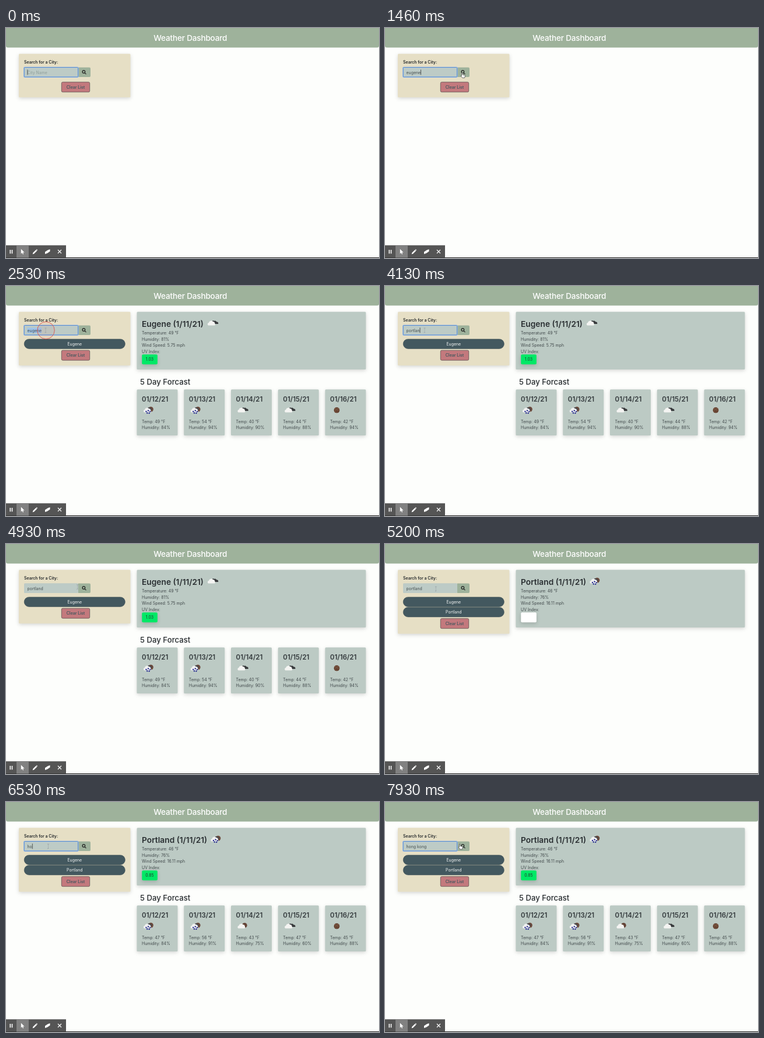
These frames come from a looping animation (640x394 px, 8000 ms). An HTML page:

```html
<!DOCTYPE html>
<html lang="en">
<head>
<meta charset="utf-8">
<title>Weather Dashboard</title>
<style>
html, body { margin: 0; width: 100%; height: 100%; overflow: hidden; background: #fdfefc; }
svg { display: block; width: 100%; height: 100%; font: 6.95px Inter, sans-serif; }
.mid { text-anchor: middle; }
.b { font-weight: 600; }
.shade { filter: drop-shadow(0 2px 3px rgba(0, 0, 0, .16)); }
</style>
</head>
<body>
<svg id="stage" viewBox="0 0 640 394" preserveAspectRatio="none">
  <defs>
    <path id="puff" d="M1.5 9A2.6 2.6 0 0 1 2.6 4.3A4 4 0 0 1 9.6 2.6A3.1 3.1 0 0 1 13 6Q14.2 9 12 9Z"/>
    <g id="cloudy">
      <path d="M7 3Q9 -.5 12 1.3Q14.5 .2 15.6 2.7Q19.5 3 18.6 6.4H11Z" fill="#383a3c"/>
      <use href="#puff" fill="#f4f4f2"/>
    </g>
    <g id="fewclouds">
      <circle cx="12.4" cy="3.8" r="4.3" fill="#634336"/>
      <use href="#puff" fill="#f4f4f2"/>
    </g>
    <g id="rain">
      <circle cx="13" cy="3.6" r="4.4" fill="#6b4a3d"/>
      <path d="M6 4Q8 -1.4 11.4 1Q14 1 14.6 4L12 7Z" fill="#45464a"/>
      <use href="#puff" fill="#f0f0f0"/>
      <g fill="#262c91">
        <circle cx="5" cy="7.4" r="1.2"/><circle cx="8.6" cy="6" r="1.2"/><circle cx="11.8" cy="7.6" r="1.2"/>
        <circle cx="6.8" cy="10" r="1.2"/><circle cx="10.2" cy="10.2" r="1.2"/>
      </g>
    </g>
    <g id="clear">
      <circle cx="10" cy="5.2" r="4.9" fill="#65412f"/>
      <path d="M6 2.5Q9 5 14 2M7 7L9 6M11 6.5L13 5" stroke="#9a7762" stroke-width=".8" fill="none"/>
    </g>
    <path id="hand" d="M2 .5Q3.1 .3 3.2 1.4V4L6.4 4.6Q7.6 4.8 7.4 6.2L6.6 9.4H2.8L.3 6.2Q.2 5 1.5 5.6V1.2Q1.5 .6 2 .5Z" fill="#fff" stroke="#333" stroke-width=".7"/>
    <path id="arrow" d="M0 0V8.4L2 6.6L3.3 9.4L4.6 8.8L3.4 6.1H6Z" fill="#222" stroke="#fff" stroke-width=".6"/>
    <path id="beam" d="M-1.3 -4Q0 -4 0 -3V3Q0 4 -1.3 4M1.3 -4Q0 -4 0 -3M0 3Q0 4 1.3 4" fill="none" stroke="#667" stroke-width=".7" stroke-dasharray="1 1.2" opacity=".75"/>
  </defs>

  <rect width="640" height="394" fill="#fdfefc"/>
  <path d="M0 0H640V30.5Q640 33.5 637 33.5H3Q0 33.5 0 30.5Z" fill="#9eb29b"/>
  <text class="mid" x="316.3" y="22.3" fill="#fff" font-size="13.6" font-weight="500" letter-spacing="-.2">Weather Dashboard</text>

  <g id="view"></g>

  <rect y="393" width="640" height="1" fill="#1b1b1b"/>
  <path d="M0 372.3H103V393.4H0Z" fill="#555"/>
  <path d="M18 372.3H39V393.4H18Z" fill="#818181"/>
  <g fill="#fff">
    <path d="M6.5 380H8.1V386.5H6.5ZM9.7 380H11.3V386.5H9.7Z"/>
    <path d="M25.8 378.5V386.7L27.7 385L29 387.8L30.2 387.2L29 384.6H31.6Z"/>
    <path d="M45.7 387.4L46.3 385L51.4 379.9L53.2 381.7L48.1 386.8ZM51.9 379.4L52.5 378.8L54.3 380.6L53.7 381.2Z"/>
    <path d="M67 387.3V383.5L71.5 380.5L75.5 379V382.8L71 385.8Z"/>
  </g>
  <path d="M89 380L95 386M95 380L89 386" stroke="#fff" stroke-width="1.2"/>
</svg>

<script>
const LOOP = 8000;
const view = document.getElementById('view');
const pen = document.createElement('canvas').getContext('2d');
pen.font = '6.95px Inter, sans-serif';

const days = (temps, hums, icons) => temps.map((temp, i) => ({ temp, hum: hums[i], icon: icons[i] }));
const EUGENE = {
  name: 'Eugene', temp: 49, hum: 81, wind: '5.75', uv: '1.03', icon: 'cloudy', iconX: 345.5,
  days: days([49, 54, 40, 44, 42], [84, 94, 90, 88, 94], ['rain', 'rain', 'cloudy', 'cloudy', 'clear'])
};
const PORTLAND = {
  name: 'Portland', temp: 46, hum: 76, wind: '16.11', uv: '0.85', icon: 'rain', iconX: 351,
  days: days([47, 56, 43, 47, 45], [84, 91, 75, 60, 88], ['rain', 'rain', 'fewclouds', 'cloudy', 'clear'])
};

// Each word with the times of its keystrokes
const WORDS = [
  ['eugene', [660, 730, 860, 1000, 1130, 1200]],
  ['portland', [3330, 3460, 3600, 3730, 3860, 4000, 4060, 4200]],
  ['hong kong', [6400, 6470, 6600, 6670, 6800, 6870, 7000, 7060, 7200]]
];
const CLICKS = [1530, 2430, 4660, 5560];
const PRESS = 180;
const FOCUS = [[0, 1530], [2430, 4660], [5560, LOOP]];
const SELECT = [[2460, 3330], [5600, 6400]];

// time, x, y, pointer
const PATH = [
  [60, 116, 93, 'arrow'], [260, 116, 93, 'arrow'], [400, 130, 76, 'hand'],
  [1660, 130, 76, 'hand'], [1800, 118, 80, 'hand'], [2060, 118, 80, 'arrow'],
  [2400, 68, 76, 'beam'], [4260, 68, 76, 'beam'], [4600, 130, 73, 'hand'],
  [4860, 130, 73, 'beam'], [5130, 87.3, 77, 'beam'], [5330, 87.3, 77, 'beam'],
  [5530, 72.5, 76, 'beam'], [7260, 72.5, 76, 'beam'], [7860, 126, 71.5, 'hand']
];

const within = (t, spans) => spans.some(([a, b]) => t >= a && t < b);
const rect = (x, y, w, h, fill, r = 0, more = '') =>
  `<rect x="${x}" y="${y}" width="${w}" height="${h}" rx="${r}" fill="${fill}" ${more}/>`;
const text = (x, y, s, fill = '#41494b', more = '') => `<text x="${x}" y="${y}" fill="${fill}" ${more}>${s}</text>`;
const use = (id, x, y) => `<use href="#${id}" x="${x}" y="${y}"/>`;

function typed(t) {
  let value = '', last = 0;
  for (const [word, keys] of WORDS) {
    const n = keys.filter(k => k <= t).length;
    if (n) { value = word.slice(0, n); last = keys[n - 1]; }
  }
  return { value, last };
}

function caretOn(t, last) {
  if (!last) return t < 60 || t >= 600;
  return (t - Math.max(last, ...CLICKS.filter(c => c <= t))) % 1060 < 530;
}

function pointer(t) {
  const i = PATH.findLastIndex(p => p[0] <= t);
  if (i < 0) return null;
  const [t0, x0, y0, kind] = PATH[i];
  const [t1, x1, y1] = PATH[i + 1] || [t0 + 1, x0, y0];
  const u = Math.min(1, (t - t0) / (t1 - t0));
  const k = u * u * (3 - 2 * u);
  return { x: x0 + (x1 - x0) * k, y: y0 + (y1 - y0) * k, kind };
}

function searchBox(t) {
  const { value, last } = typed(t);
  const w = pen.measureText(value).width;
  const focus = within(t, FOCUS), selected = within(t, SELECT);
  let s = rect(31, 67.3, 93, 16.8, '#bdcbc6', 1.5);
  s += '<path d="M124 67.5H143Q145 67.5 145 69.5V82Q145 84 143 84H124Z" fill="#9eb29b"/>';
  s += '<g fill="none" stroke="#222" stroke-width="1.2"><circle cx="133.4" cy="75" r="2.3"/><path d="M135.1 76.8L137.5 79.2"/></g>';
  if (focus) {
    s += rect(31, 67.3, 92.8, 16.8, 'none', 1, 'stroke="#a9c4e6" stroke-width="1.8"');
    s += rect(31.2, 67.5, 92.4, 16.4, 'none', 1, 'stroke="#4f86cf" stroke-width=".9"');
  }
  if (selected) s += rect(36.5, 71.5, w, 9, '#9fc4ea');
  s += value ? text(36.5, 78.5, value, '#454f50') : text(36.5, 78.5, 'City Name', '#8f9f9b');
  if (focus && !selected && caretOn(t, last)) s += rect(36.6 + w, 71.3, .7, 9, '#222');
  return s;
}

function sidebar(t, cities) {
  const drop = cities.length * 17.5;
  let s = rect(22, 44.3, 191.5, 74.5 + drop, '#e6dfc5', 1.5, 'class="shade"');
  s += text(31, 61, 'Search for a City:', '#25292b', 'class="b"') + searchBox(t);
  cities.forEach((c, i) => {
    s += rect(31.2, 90.9 + i * 17.5, 173.2, 16.6, '#43585f', 8.3, 'stroke="#34464d" stroke-width=".5"');
    s += text(117.8, 101.6 + i * 17.5, c.name, '#f4f6f5', 'class="mid"');
  });
  s += rect(95.3, 92.7 + drop, 48.4, 17, '#c3797d', 2, 'stroke="#5c5052" stroke-width=".8"');
  return s + text(119.5, 103.8 + drop, 'Clear List', '#43585f', 'class="mid b"');
}

function current(city, full) {
  let s = rect(224.5, 44.3, 393, 98.7, '#bccac4', 1.5, 'class="shade"');
  s += text(233, 69.8, `${city.name} (1/11/21)`, '#2a2f32', 'class="b" font-size="13.75"');
  s += use(city.icon, city.iconX, 58.5);
  [`Temperature: ${city.temp} °F`, `Humidity: ${city.hum}%`, `Wind Speed: ${city.wind} mph`, 'UV Index:']
    .forEach((line, i) => s += text(233, 83.3 + i * 10.4, line));
  s += rect(233.3, 117.3, 26.6, 17, full ? '#00e866' : '#fff', 2, 'class="shade"');
  return full ? s + text(246.5, 128.2, city.uv, '#26382d', 'class="mid"') : s;
}

function forecast(city) {
  let s = text(230, 168.8, '5 Day Forcast', '#262b2e', 'font-weight="500" font-size="13.2"');
  city.days.forEach((d, i) => {
    const x = 224.5 + i * 80.75;
    s += rect(x, 177.2, 70, 78.8, '#bccac4', 1.5, 'class="shade"');
    s += text(x + 8.6, 198.3, `01/${12 + i}/21`, '#33393c', 'class="b" font-size="11.5"');
    s += use(d.icon, x + (d.icon === 'clear' ? 10 : 11), 207.5);
    s += text(x + 8.6, 234.6, `Temp: ${d.temp} °F`) + text(x + 8.6, 244.9, `Humidity: ${d.hum}%`);
  });
  return s;
}

function draw(t) {
  const cities = [EUGENE, PORTLAND].slice(0, t < 1860 ? 0 : t < 5060 ? 1 : 2);
  const city = cities[cities.length - 1];
  let s = sidebar(t, cities);
  if (city) {
    const full = within(t, [[2060, 5060], [5330, LOOP]]);
    s += current(city, full) + (full ? forecast(city) : '');
  } else if (t >= 1730) {
    s += rect(224.5, 44.3, 393, 49, '#bccac4', 1.5, 'class="shade"');
  }
  const p = pointer(t);
  if (p) {
    if (CLICKS.some(c => t >= c && t < c + PRESS)) {
      s += `<circle cx="${p.x + .5}" cy="${p.y}" r="14.8" fill="rgba(230,70,70,.06)" stroke="#d9534f" stroke-width=".9"/>`;
    }
    s += use(p.kind, p.x, p.y);
  }
  return s;
}

let shown = '';
function tick() {
  const markup = draw(performance.now() % LOOP);
  if (markup !== shown) view.innerHTML = shown = markup;
  requestAnimationFrame(tick);
}
tick();
</script>
</body>
</html>
```
